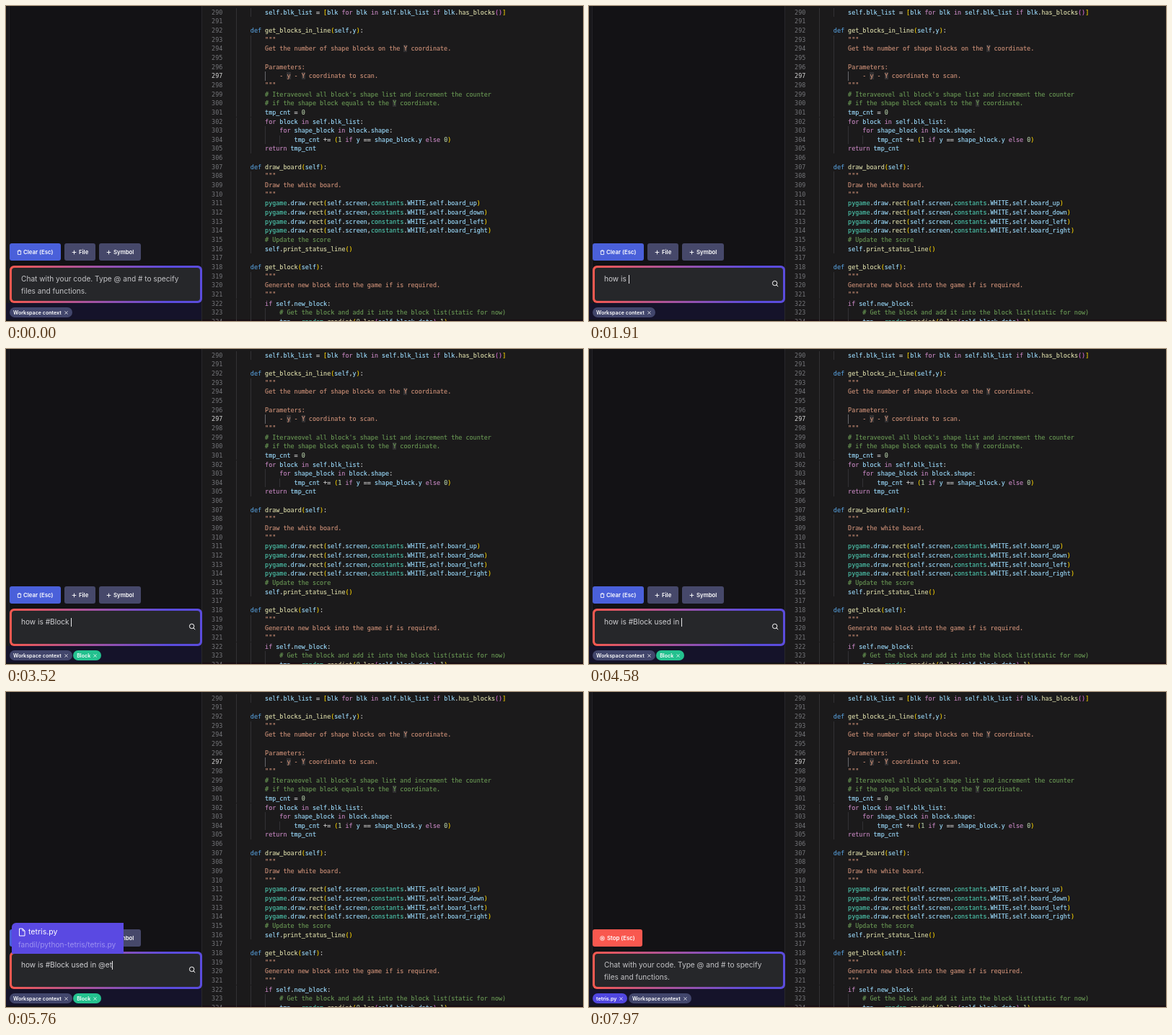
Write an HTML page that moves like this. It is 800 by 438 pixels and loops after 8 s.

```html
<!DOCTYPE html>
<html lang="en">
<head>
<meta charset="utf-8">
<title>Chat with your code</title>
<style>
html, body { margin: 0; width: 100%; height: 100%; overflow: hidden; background: #1b1a1b; }
#stage { position: relative; width: 800px; height: 438px; overflow: hidden; background: #1b1a1b;
  font-family: Inter, "Open Sans", sans-serif; color: #fff; }
#stage div, #stage i { position: absolute; box-sizing: border-box; white-space: pre; }
#stage svg { display: block; flex: none; fill: none; stroke: currentColor; }

/* Editor */
#code { inset: 0; font: 8.42px/12.65px "DejaVu Sans Mono", monospace; color: #d4d4d4; }
#code .num { left: 270px; width: 30.3px; text-align: right; color: #75767a; }
#code .num.on { color: #d6d6d6; }
#code .line { left: 318.6px; -webkit-text-stroke: .12px; }
#code i { width: 1px; height: 12.65px; background: #323134; }
#code i.on { background: #66666a; }
.doc { color: #ce9178; }
.com { color: #6a9955; }
.def { color: #569cd6; }
.key { color: #c586c0; }
.fun { color: #dcdcaa; }
.mod { color: #4ec9b0; }
.int { color: #b5cea8; }
.var { color: #9cdcfe; }
.b0 { color: #ffd700; }
.b1 { color: #da70d6; }
.hl { background: #313032; }

/* Chat panel */
#panel { left: 0; top: 0; width: 272px; height: 438px; background: #131215; border-right: 1px solid #28272b; }
#edge { left: 0; top: 0; width: 5px; height: 413px; background: #19181b; border-right: 1px solid #232226; }
#foot { left: 0; top: 413px; width: 271px; height: 23px; background: #15132a; }
#base { left: 0; top: 436px; width: 800px; height: 2px; background: #180d13; }
#stage .btn { top: 330px; height: 24px; border-radius: 3px; padding-left: 10px; background: #46486a;
  display: flex; align-items: center; gap: 3px; font-size: 7.8px; font-weight: 600; }
#stage .btn.clear { background: #4a60da; gap: 2px; }
#stage .btn.stop { background: #f9584f; }
#box { left: 5px; top: 361px; width: 266.5px; height: 51.5px; border-radius: 6px;
  background: linear-gradient(90deg, #f4594f, #a553a0 42%, #5b4cdd 82%); }
#field { left: 3px; top: 3px; right: 3px; bottom: 3px; border-radius: 4px; background: #26272a; }
#text { left: 21px; top: 371px; font-size: 10.15px; line-height: 16.6px; color: #cfcfd2; }
#text.hint { color: #c3c3c6; }
#text b { display: inline-block; width: 1px; height: 12px; background: #e8e8ea; vertical-align: -2.5px; }
#find { left: 253px; top: 381px; }
#chips { left: 5px; top: 419px; display: flex; gap: 1.5px; }
#stage .chip { position: static; height: 14px; border-radius: 7px; padding: 0 6px 0 5px;
  display: flex; align-items: center; gap: 4px; font-size: 7.1px; font-weight: 600; }

/* Suggestions */
#menu { left: 8px; bottom: 74.5px; border-radius: 6px 0 0 0; overflow: hidden; background: #25272a; }
#stage .item { position: relative; height: 42.75px; }
#stage .item svg { position: absolute; left: 8px; top: 7px; }
.item .name { left: 23px; top: 6px; font-size: 10.6px; line-height: 14px; }
.item .path { left: 9px; top: 23px; font-size: 10.2px; line-height: 14px; color: #717278; }
.item .path b { font-weight: 500; color: #898a90; }
.item.on { background: #5a49e2; }
.item.on .path { color: #9d92f0; }
.item.on .path b { color: #b9b1f5; }
</style>
</head>
<body>
<div id="stage">
  <div id="base"></div>
  <div id="code"></div>
  <div id="panel"></div><div id="edge"></div><div id="foot"></div>
  <div id="buttons"></div>
  <div id="box"><div id="field"></div></div>
  <div id="menu"></div>
  <div id="text"></div>
  <div id="find"></div>
  <div id="chips"></div>
</div>
<script>
const LOOP = 8000, FIRST = 290, PITCH = 12.65, COL = 5.069;
const $ = id => document.getElementById(id);

const source = `        self.blk_list = [blk for blk in self.blk_list if blk.has_blocks()]

    def get_blocks_in_line(self,y):
        """
        Get the number of shape blocks on the Y coordinate.

        Parameters:
            - y - Y coordinate to scan.
        """
        # Iteraveovel all block's shape list and increment the counter
        # if the shape block equals to the Y coordinate.
        tmp_cnt = 0
        for block in self.blk_list:
            for shape_block in block.shape:
                tmp_cnt += (1 if y == shape_block.y else 0)
        return tmp_cnt

    def draw_board(self):
        """
        Draw the white board.
        """
        pygame.draw.rect(self.screen,constants.WHITE,self.board_up)
        pygame.draw.rect(self.screen,constants.WHITE,self.board_down)
        pygame.draw.rect(self.screen,constants.WHITE,self.board_left)
        pygame.draw.rect(self.screen,constants.WHITE,self.board_right)
        # Update the score
        self.print_status_line()

    def get_block(self):
        """
        Generate new block into the game if is required.
        """
        if self.new_block:
            # Get the block and add it into the block list(static for now)
            tmp = random.randint(0,len(self.block_data)-1)`;

const span = (cls, s) => `<span class="${cls}">${s}</span>`;
const mark = s => s.replace(/\bY\b|\by\b(?= -)/g, m => span('hl', m));

function tint(line) {
  let depth = 0;
  return line.replace(/#.*|\w+|[()[\]]/g, (tok, at) => {
    if (tok[0] === '#') return span('com', mark(tok));
    if (/[([]/.test(tok)) return span('b' + depth++ % 2, tok);
    if (/[)\]]/.test(tok)) return span('b' + --depth % 2, tok);
    if (tok === 'def') return span('def', tok);
    if (/^(for|in|if|else|return)$/.test(tok)) return span('key', tok);
    if (/^(pygame|constants|random)$/.test(tok)) return span('mod', tok);
    if (/^\d/.test(tok)) return span('int', tok);
    return span(line[at + tok.length] === '(' ? 'fun' : 'var', tok);
  });
}

function drawCode() {
  let inDoc = false, html = '';
  source.split('\n').forEach((line, i) => {
    const top = `top:${(2.7 + i * PITCH).toFixed(2)}px`;
    const active = i + FIRST === 297 ? ' on' : '';
    const guide = (col, cls = '') =>
      `<i class="${cls}" style="${top};left:${Math.round(318.6 + col * COL)}px"></i>`;
    const quote = line.includes('"""');
    const body = quote || inDoc ? span('doc', mark(line)) : tint(line);
    if (quote) inDoc = !inDoc;
    const indent = line.search(/\S/);
    html += guide(0);
    if (indent > 4 || inDoc) html += guide(4);
    if (indent > 8) html += guide(8, active);
    if (indent > 12) html += guide(12);
    html += `<div class="num${active}" style="${top}">${i + FIRST}</div>` +
      `<div class="line" style="${top}">${body}</div>`;
  });
  $('code').innerHTML = html;
}

const svg = (size, view, path, width = 1) =>
  `<svg width="${size}" height="${size}" viewBox="0 0 ${view} ${view}" stroke-width="${width}"><path d="${path}"/></svg>`;
const icons = {
  trash: svg(7, 10, 'M1 2.5H9M3.5 2.3V1H6.5V2.3M2 2.5V9.3H8V2.5', 1.2),
  plus: svg(7, 10, 'M5 1V9M1 5H9', 1.3),
  stop: svg(7, 10, 'M9.2 5A4.2 4.2 0 1 1 .8 5A4.2 4.2 0 1 1 9.2 5M3.6 3.6H6.4V6.4H3.6Z', 1.2),
  close: svg(5, 10, 'M1 1L9 9M9 1L1 9', 1.6),
  find: svg(10, 10, 'M7.8 4.5A3.2 3.2 0 1 1 1.4 4.5A3.2 3.2 0 1 1 7.8 4.5M6.9 6.9L9.2 9.2'),
  Method: svg(12, 12, 'M4 3L1 6L4 9M8 3L11 6L8 9'),
  Class: svg(12, 12, 'M6 1L10.5 3.5V8.5L6 11L1.5 8.5V3.5ZM1.5 3.5L6 6L10.5 3.5M6 6V11'),
  file: svg(12, 12, 'M2.5 1H7L10 4V11H2.5ZM7 1V4H10')
};

const root = 'fandil/python-tetris/';
const symbols = [
  ['block_colides', 'Method', 'tetris.py:202-215'],
  ['get_blocks_in_line', 'Method', 'tetris.py:291-304'],
  ['get_block', 'Method', 'tetris.py:317-327'],
  ['Block', 'Class', 'block.py:27-201'],
  ['remove_blocks', 'Method', 'block.py:105-126'],
  ['has_blocks', 'Method', 'block.py:128-132']
];
const files = [['tetris.py', '', 'tetris.py']];

const item = ([name, kind, path], on) =>
  `<div class="item${on ? ' on' : ''}">${icons[kind || 'file']}<div class="name">${name}</div>` +
  `<div class="path">${kind && `<b>${kind}</b> `}${root}${path}</div></div>`;
const button = (left, width, icon, label, cls = '') =>
  `<div class="btn ${cls}" style="left:${left}px;width:${width}px">${icons[icon]}${label}</div>`;
const chip = (label, color) =>
  `<div class="chip" style="background:${color}">${label}${icons.close}</div>`;

// Typed runs: start, time per key, text already there, text being typed
const runs = [
  [940, 135, '', 'how is '],
  [2180, 150, 'how is ', '#blo'],
  [3420, 0, 'how is #Block ', ''],
  [3600, 115, 'how is #Block ', 'used in '],
  [5060, 270, 'how is #Block used in ', '@et'],
  [6240, 0, 'how is #Block used in @tetris.py ', ''],
  [6620, 0, 'how is #Block used in @tetris.py ?', '']
];
const SENT = 7400;

function typed(t) {
  if (t >= SENT) return '';
  const run = runs.filter(r => t >= r[0]).pop();
  if (!run) return '';
  const [start, step, base, more] = run;
  return base + more.slice(0, step ? 1 + Math.floor((t - start) / step) : 0);
}

function pose(t) {
  const text = typed(t);
  const menu = t >= 2180 && t < 3420 ? 'symbols' : t >= 5060 && t < 6240 ? 'files' : '';
  const pick = menu === 'symbols' ? [2860, 3020, 3180].filter(k => t >= k).length : 0;
  return { text, menu, pick, block: t >= 3420, file: t >= 6240, sent: t >= SENT };
}

function draw({ text, menu, pick, block, file, sent }) {
  $('text').className = text ? '' : 'hint';
  $('text').innerHTML = text ? text + '<b></b>'
    : 'Chat with your code. Type @ and # to specify\nfiles and functions.';
  $('find').innerHTML = text ? icons.find : '';
  $('buttons').innerHTML = sent ? button(5, 69, 'stop', 'Stop (Esc)', 'stop')
    : button(5, 71, 'trash', 'Clear (Esc)', 'clear') + button(81, 43, 'plus', 'File') + button(129, 58, 'plus', 'Symbol');
  const work = chip('Workspace context', '#42466c');
  $('chips').innerHTML = sent ? chip('tetris.py', '#5046e0') + work
    : work + (block ? chip('Block', '#24c18f') : '') + (file ? chip('tetris.py', '#1cb9e9') : '');
  const list = menu === 'symbols' ? symbols : menu ? files : [];
  $('menu').style.width = (menu === 'files' ? 155 : 236) + 'px';
  $('menu').innerHTML = list.map((row, i) => item(row, i === pick)).join('');
}

let last = '';
function tick() {
  const state = pose(performance.now() % LOOP), key = JSON.stringify(state);
  if (key !== last) draw(state);
  last = key;
  requestAnimationFrame(tick);
}
drawCode();
tick();
</script>
</body>
</html>
```
